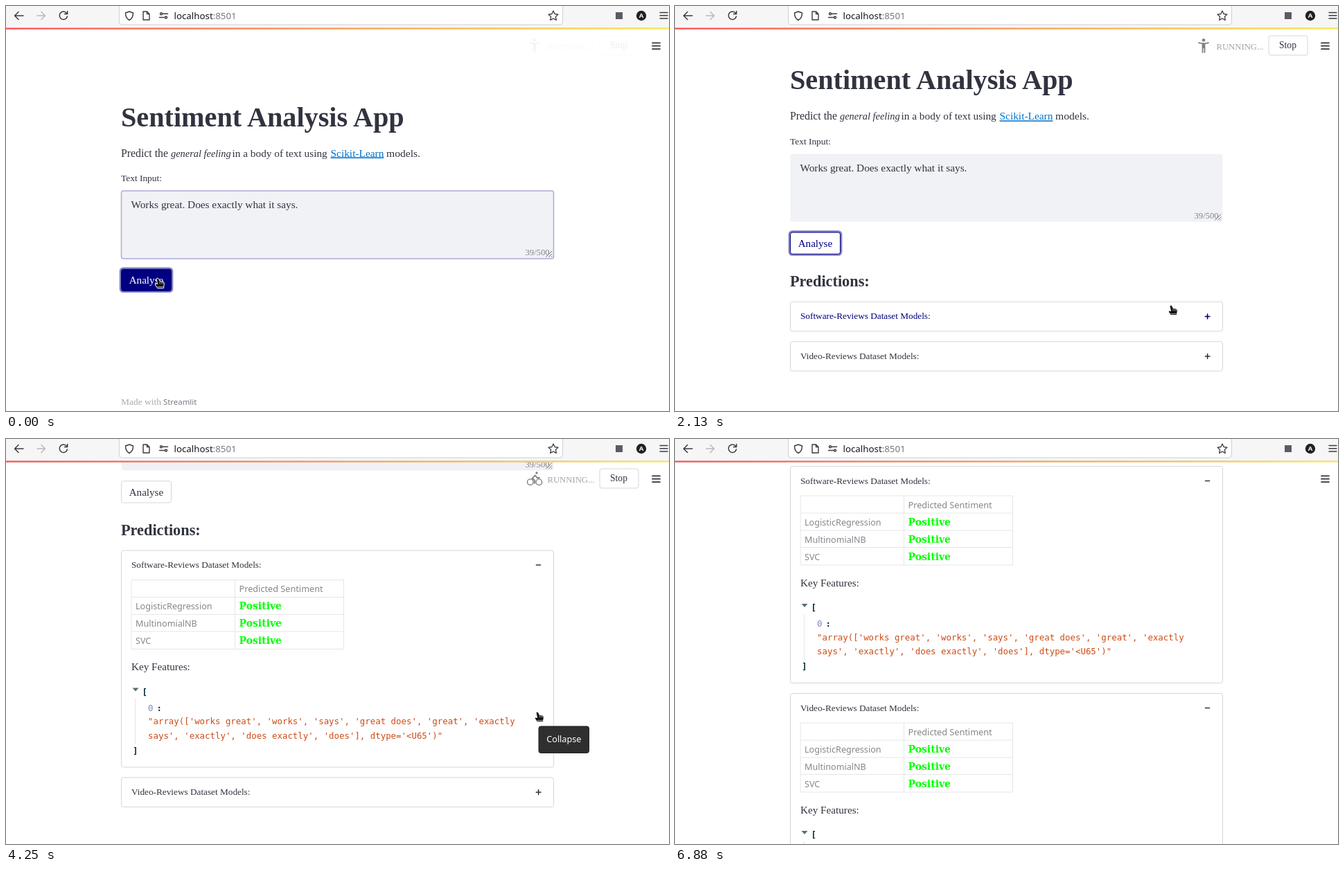
An HTML page that plays this animation: 957x585 px, repeating every 7010 ms.

```html
<!DOCTYPE html>
<html lang="en">
<head>
<meta charset="utf-8">
<title>Sentiment Analysis App</title>
<style>
html, body { margin: 0; width: 100%; height: 100%; overflow: hidden; background: #fff; }
svg { display: block; }
text { fill: currentColor; white-space: pre; }
.serif { font-family: "Liberation Serif", serif; }
.sans { font-family: "Noto Sans", sans-serif; }
.mono { font-family: "DejaVu Sans Mono", monospace; }
.lime { font: bold 14px "DejaVu Serif", serif; }
.b { font-weight: bold; }
.line { fill: none; stroke: currentColor; stroke-linecap: round; stroke-linejoin: round; }
</style>
</head>
<body>
<svg id="stage" width="957" height="585" viewBox="0 0 957 585"></svg>
<script>
const LOOP = 7010, TICK = 125;
const INK = '#31333f', NAVY = '#000080', EDGE = '#d6d6d9';

const text = (x, y, size, str, color = INK, cls = 'serif', extra = '') =>
  `<text x="${x}" y="${y}" font-size="${size}" color="${color}" class="${cls}" ${extra}>${str}</text>`;
const rect = (x, y, w, h, fill, stroke = 'none', r = 0, extra = '') =>
  `<rect x="${x}" y="${y}" width="${w}" height="${h}" rx="${r}" fill="${fill}" stroke="${stroke}" ${extra}/>`;
const line = (d, color, width = 1.5, extra = '') =>
  `<path class="line" d="${d}" color="${color}" stroke-width="${width}" ${extra}/>`;
const group = (id, body, extra = '') => `<g id="${id}" ${extra}>${body}</g>`;

function toolbar() {
  const dark = '#3a3a40';
  return rect(0, 0, 957, 32, '#f6f6f7') +
    rect(163.5, -6, 640, 33, '#fff', '#cfcfd4', 4) +
    line('M25 14H13M18 8.500L12.500 14L18 19.500', dark) +
    line('M45 14H56M51 8.500L56.500 14L51 19.500', '#b9b9bd') +
    line('M87.500 10.300A5.700 5.700 0 1 0 88.500 15M88.700 7.500V11.500H84.500', dark) +
    line('M178 8L183.500 10C183.500 15 182 18.500 178 20.500C174 18.500 172.500 15 172.500 10Z', dark, 1.4) +
    line('M198 8H203.500L207 11.500V20H198ZM203.500 8V11.500H207', dark, 1.4) +
    line('M226.500 11.300H233.500M221.500 16.500H228.500', dark, 1.4) +
    `<g fill="none" stroke="${dark}" stroke-width="1.400"><circle cx="224" cy="11.300" r="1.500"/><circle cx="231" cy="16.500" r="1.500"/></g>` +
    text(242.5, 18.5, 13.3, 'localhost<tspan fill="#77777d">:8501</tspan>', '#15141a', 'sans') +
    line('M790 7L792.100 11.500L797 12.100L793.400 15.500L794.300 20.400L790 18L785.700 20.400L786.600 15.500L783 12.100L787.900 11.500Z', dark, 1.3) +
    rect(880, 9, 10, 10, '#5b5b66') +
    `<circle cx="917" cy="14" r="7.200" fill="#202124"/>` +
    text(917, 17.4, 9.5, 'A', '#fff', 'sans b', 'text-anchor="middle"') +
    line('M944 9.500H955M944 13.700H955M944 18H955', dark, 1.4) +
    rect(0, 31, 957, 1, '#dcdce0') +
    rect(0, 31.6, 957, 2.1, 'url(#rainbow)');
}

const poses = {
  stand: '<circle cx="763" cy="49.300" r="2.300"/><path d="M756 53.200Q763 55 770 53.200M763 55V60M761.500 54.500V67M764.500 54.500V67"/>',
  run: '<circle cx="765.500" cy="49.300" r="2"/><path d="M757.500 56.500L760.500 53L764.500 53.500L767 57L770.500 57.500M764 54L762 59.500L766 62L765.500 67M762 59.500L760 63.500L755.500 63"/>',
  bike: '<circle cx="766" cy="49" r="1.700"/><g fill="none" stroke-width="1.400"><circle cx="756.800" cy="62.200" r="4.300"/><circle cx="769.300" cy="62.200" r="4.300"/></g><path d="M763 64V59.500L759.500 57L764 52.500L766.500 56H770"/>',
  wheel: '<circle cx="767" cy="49.300" r="2"/><path d="M758.500 54.500L761.500 52L765.500 54L762.500 59.500L768 60L768.500 64.500M759.500 58.500A4.700 4.700 0 1 0 766 65"/>'
};

function header() {
  const figures = Object.entries(poses).map(([name, body]) =>
    group(name, body, 'fill="#808080" stroke="#808080" stroke-width="1.800" stroke-linecap="round" stroke-linejoin="round"')
      .replace(/<path/g, '<path fill="none"')
      .replace(/<circle/, '<circle stroke="none"')).join('');
  return group('status', figures + text(781.5, 63, 12.7, 'RUNNING...', '#a3a4ab') +
    rect(857, 43, 56, 28, '#fff', EDGE, 3) + text(872, 61, 13.6, 'Stop')) +
    line('M933 53.300H944M933 57.700H944M933 62.100H944', INK, 1.8);
}

function expander(id, title) {
  const gray = '#85868c', grid = '#e6e6ea';
  const models = ['LogisticRegression', 'MultinomialNB', 'SVC'];
  const table = line('M181.500 42.500H487.500V142.500H181.500ZM181.500 67.500H487.500M181.500 92.500H487.500M181.500 117H487.500M330.500 42.500V142.500', grid, 1) +
    text(336.5, 60, 12.7, 'Predicted Sentiment', gray, 'sans') +
    models.map((name, i) => text(187, 85 + i * 25, 12.6, name, gray, 'sans') +
      text(336.5, 85.2 + i * 25, 14, 'Positive', '#00ff00', 'lime')).join('');
  const code = (y, str) => text(205, y, 12.4, str, '#cb4b16', 'mono');
  const json = text(181, 173, 15.2, 'Key Features:') +
    '<path d="M182.500 198.500H191.500L187 203.500Z" fill="#586e75"/>' +
    text(196.5, 208.5, 12.4, '[', '#002b36', 'mono b') +
    rect(186, 214, 1, 66, '#e6e6e8') +
    text(205, 231.5, 12.4, '0', '#8488cf', 'mono') + text(217.5, 231.5, 12.4, ':', '#002b36', 'mono b') +
    code(251, `"array(['works great', 'works', 'says', 'great does', 'great', 'exactly`) +
    code(271.5, `says', 'exactly', 'does exactly', 'does'], dtype='&lt;U65')"`) +
    text(183, 293.5, 12.4, ']', '#002b36', 'mono b');
  return group(id,
    rect(166.5, 0, 624, 42.5, '#fff', EDGE, 3, 'class="box"') +
    group(id + 'Head', text(181, 25, 13.25, title, 'currentColor') +
      '<path class="line sign" stroke-width="1.600"/>') +
    group(id + 'Body', table + json));
}

function page() {
  return text(166, 173.5, 40.2, 'Sentiment Analysis App', INK, 'serif b') +
    text(166, 217.5, 15.8, 'Predict the') +
    text(238, 217.5, 14.4, 'general feeling', INK, 'serif', 'font-style="italic"') +
    text(326.5, 217.5, 15.3, 'in a body of text using') +
    text(468.5, 217.5, 15.4, 'Scikit-Learn', '#0072ce', 'serif', 'text-decoration="underline"') +
    text(549, 217.5, 15.6, 'models.') +
    text(166, 253, 13.4, 'Text Input:') +
    rect(166.5, 267, 624, 98, '#f0f2f6', 'none', 3, 'id="area" stroke-width="1.500"') +
    text(180.5, 292, 15.3, 'Works great. Does exactly what it says.') +
    text(749.5, 360, 12.6, '39/500', '#85868f') +
    line('M779.500 362.500L788 354M783.500 362.500L788 358M787 362.500L788 361.500', '#777', 1) +
    rect(165.2, 379, 74.6, 33.6, 'none', '#8080c0', 4, 'id="ring" stroke-width="3"') +
    rect(166.5, 380.3, 72, 31.2, '#fff', EDGE, 3, 'id="button"') +
    group('label', text(177.7, 401, 15.1, 'Analyse', 'currentColor')) +
    group('heading', text(166, 458.5, 22.3, 'Predictions:', INK, 'serif b') +
      group('anchor', '<g transform="translate(141 452) rotate(-45)">' +
        line('M-1 -3H-4A3 3 0 0 0 -4 3H-1M1 -3H4A3 3 0 0 1 4 3H1M-3 0H3', '#84858c', 1.4) + '</g>')) +
    expander('software', 'Software-Reviews Dataset Models:') +
    expander('video', 'Video-Reviews Dataset Models:') +
    group('footer', text(166, 4.5, 13.5, 'Made with', '#a9aab0') + text(227, 4.5, 11.4, 'Streamlit', '#777982', 'sans'));
}

const arrow = '<path d="M0 0V13.500L3.200 10.700L5.500 15.800L7.700 14.800L5.500 9.800L9.500 9.500Z" fill="#111" stroke="#fff" stroke-width=".8"/>';
const hand = '<path d="M-2 1Q0 -1 1.500 1L3.200 4.500L7 5Q9.500 5.500 9.300 8L8.500 14.500H-.5L-3.500 10Q-4.500 7.500 -2 8L-.5 8.500Z" fill="#111" stroke="#fff" stroke-width="1"/>' +
  line('M3 5.500V8M5.300 6V8M7.300 6.200V8M0 12.500H7.800', '#fff', .6);

const stage = document.getElementById('stage');
stage.innerHTML = '<defs><linearGradient id="rainbow"><stop stop-color="#ff4b4b"/><stop offset="1" stop-color="#ffea55"/></linearGradient></defs>' +
  rect(0, 0, 957, 585, '#fff') + group('page', page()) + header() + toolbar() +
  group('tip', rect(769, 415, 72.5, 38.5, '#2f2f30', '#222', 3) + text(780.3, 438.3, 12.6, 'Collapse', '#fff', 'sans')) +
  group('cursor', group('arrow', arrow) + group('hand', hand));

const $ = id => document.getElementById(id);
const show = (id, on) => $(id).setAttribute('visibility', on ? 'inherit' : 'hidden');
const move = (id, x, y) => $(id).setAttribute('transform', `translate(${x} ${y})`);
const set = (el, attrs) => { for (const k in attrs) el.setAttribute(k, attrs[k]); };

// keys: [time, ...values], linear between them
function track(keys, t) {
  const i = keys.findIndex(k => k[0] > t);
  if (i < 0) return keys[keys.length - 1].slice(1);
  if (i === 0) return keys[0].slice(1);
  const a = keys[i - 1], b = keys[i], f = (t - a[0]) / (b[0] - a[0]);
  return a.slice(1).map((v, n) => v + (b[n + 1] - v) * f);
}

const pointer = [
  [0, 219, 393], [125, 219, 393], [250, 265, 412], [375, 390, 440], [500, 505, 455],
  [750, 601, 454], [1000, 626, 446], [1750, 626, 446], [2000, 680, 436], [2250, 752, 428],
  [2500, 770, 425], [2625, 770, 411], [3000, 767, 394], [4750, 767, 394], [5000, 761, 404],
  [5375, 761, 404], [5500, 765, 399], [6125, 765, 399], [6250, 720, 310], [6375, 560, 190],
  [6500, 320, 85], [6625, 130, 22], [6750, 84, 8]
];
const scroll = [[0, 0], [1875, 0], [2375, 106.5], [3750, 106.5], [4250, 319.5], [4625, 319.5], [5000, 441]];
const fade = [[0, .07], [125, .5], [375, 1], [4625, 1], [4750, .45], [4875, 0]];
const figure = [
  [0, 'stand'], [375, 'wheel'], [625, 'run'], [875, 'stand'], [1250, 'run'], [1375, 'stand'],
  [1625, 'bike'], [1875, 'run'], [2125, 'stand'], [2500, 'wheel'], [2750, 'run'], [3000, 'stand'],
  [3250, 'wheel'], [3500, 'run'], [3750, 'stand'], [4000, 'run'], [4250, 'bike'], [4500, 'wheel']
];

function layExpander(id, top, shown, open, hot) {
  move(id, 0, top);
  show(id, shown);
  show(id + 'Body', shown && open);
  $(id).querySelector('.box').setAttribute('height', open ? 313 : 42.5);
  set($(id + 'Head'), { color: hot ? NAVY : INK });
  $(id).querySelector('.sign').setAttribute('d', open ? 'M765.500 21H771.500' : 'M765.300 21.200H772M768.600 17.800V24.600');
}

function draw(ms) {
  const t = Math.min(55, Math.floor(ms / TICK)) * TICK;
  const [x, y] = track(pointer, t), [offset] = track(scroll, t), [alpha] = track(fade, t);
  const py = y + offset;
  const heading = t >= 250, first = t >= 500, second = t >= 1875;
  const open1 = t >= 3250, open2 = t >= 5875;
  const top1 = 480.5, end1 = top1 + (open1 ? 313 : 42.5);
  const top2 = end1 + 15, end2 = top2 + (open2 ? 313 : 42.5);
  const inside = (a, b) => x > 166 && x < 791 && py > a && py < b && y > 34;
  const hot1 = first && inside(top1, top1 + 42.5);
  const hot2 = second && inside(top2, top2 + 42.5);
  const press = t < 250, focus = t < 3000;

  move('page', 0, -offset);
  set($('area'), { stroke: press ? '#adacd8' : 'none' });
  set($('button'), { fill: press ? NAVY : '#fff', stroke: focus ? NAVY : EDGE });
  set($('label'), { color: press ? '#fff' : focus ? NAVY : INK });
  show('ring', focus);
  show('heading', heading);
  show('anchor', heading && inside(432, 472));
  layExpander('software', top1, first, open1, hot1);
  layExpander('video', top2, second, open2, hot2);
  const bottom = second ? end2 : first ? end1 : heading ? 470 : 411;
  move('footer', 0, Math.max(571, bottom + 160));

  set($('status'), { opacity: alpha });
  const pose = figure.filter(f => f[0] <= t).pop()[1];
  for (const name in poses) show(name, name === pose);

  show('tip', t >= 3750 && t < 4375);
  const pointing = press || hot1 || hot2 || (t >= 3250 && t < 6250);
  move('cursor', x, y);
  show('cursor', t < 6875);
  show('hand', pointing);
  show('arrow', !pointing);
}

function frame(now) {
  draw(now % LOOP);
  requestAnimationFrame(frame);
}
draw(0);
requestAnimationFrame(frame);
</script>
</body>
</html>
```
